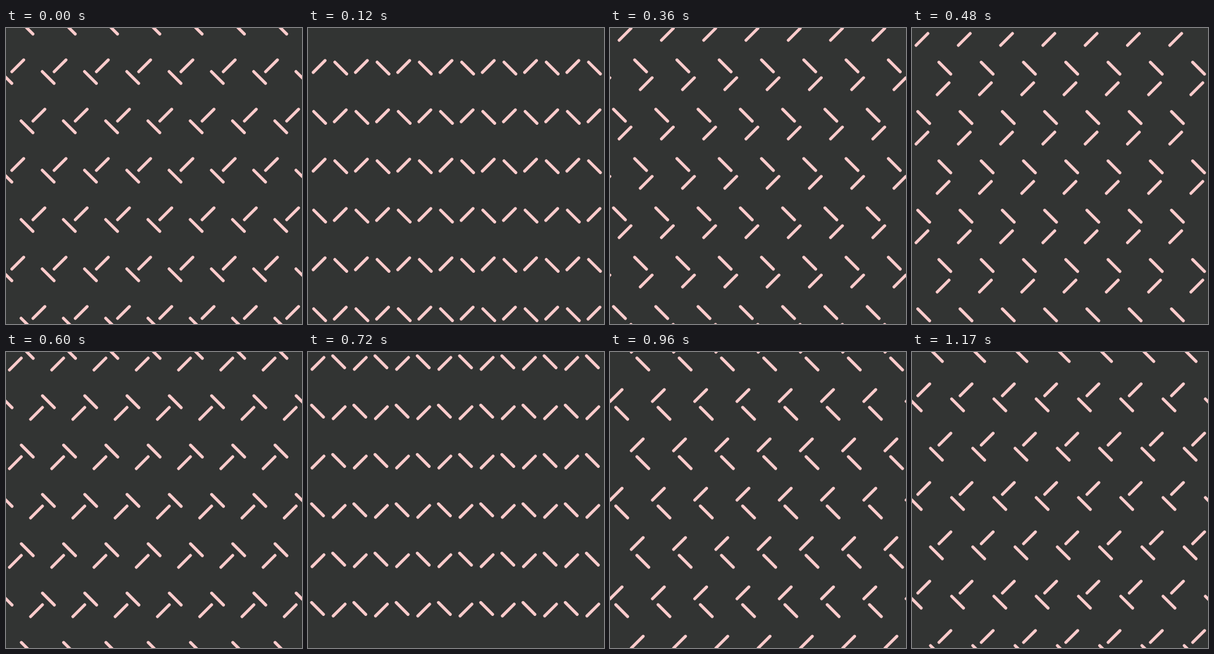
Animation, 480 px wide and 480 px high, one loop 1.2 s. Source, as an HTML page with a canvas:

```html
<!DOCTYPE html>
<html lang="en">
<head>
<meta charset="utf-8">
<title>Sliding sticks</title>
<style>
  html, body { margin: 0; width: 100%; height: 100%; overflow: hidden; background: #323433; }
  canvas { display: block; }
</style>
</head>
<body>
<canvas id="stage" width="480" height="480"></canvas>
<script>
const ctx = document.getElementById('stage').getContext('2d');
const SIZE = 480, LOOP = 1200;
const STEP_X = SIZE / 7, STEP_Y = 80;
const SLIDE = 19.1, HALF = 9.6, POWER = 3.2;

// Eased swing: 1 at phase 0, -1 at phase 0.5, back to 1 at phase 1.
function swing(phase) {
  const x = 4 * Math.abs((phase % 1) - 0.5) - 1;
  return Math.sign(x) * (1 - Math.pow(1 - Math.abs(x), POWER));
}

// A diagonal stick that slides along its own axis; slope is 1 for "\" and -1 for "/".
function stick(x, y, offset, slope) {
  const from = offset - HALF, to = offset + HALF;
  ctx.moveTo(x + from, y + slope * from);
  ctx.lineTo(x + to, y + slope * to);
}

function draw(time) {
  const phase = (time % LOOP) / LOOP;
  const falling = SLIDE * swing(phase + 0.25);
  const rising = SLIDE * swing(phase);

  ctx.fillStyle = '#323433';
  ctx.fillRect(0, 0, SIZE, SIZE);
  ctx.strokeStyle = '#ffcccc';
  ctx.lineWidth = 4.8;
  ctx.lineCap = 'round';
  ctx.beginPath();
  for (let row = 0; row <= 6; row++) {
    const shift = row % 2 ? 0 : STEP_X / 2;
    for (let col = -1; col <= 8; col++) {
      const x = col * STEP_X + shift, y = row * STEP_Y + 0.4;
      stick(x, y, falling, 1);
      stick(x, y, rising, -1);
    }
  }
  ctx.stroke();
}

const start = performance.now();
function tick() {
  draw(performance.now() - start);
  requestAnimationFrame(tick);
}
tick();
</script>
</body>
</html>
```
